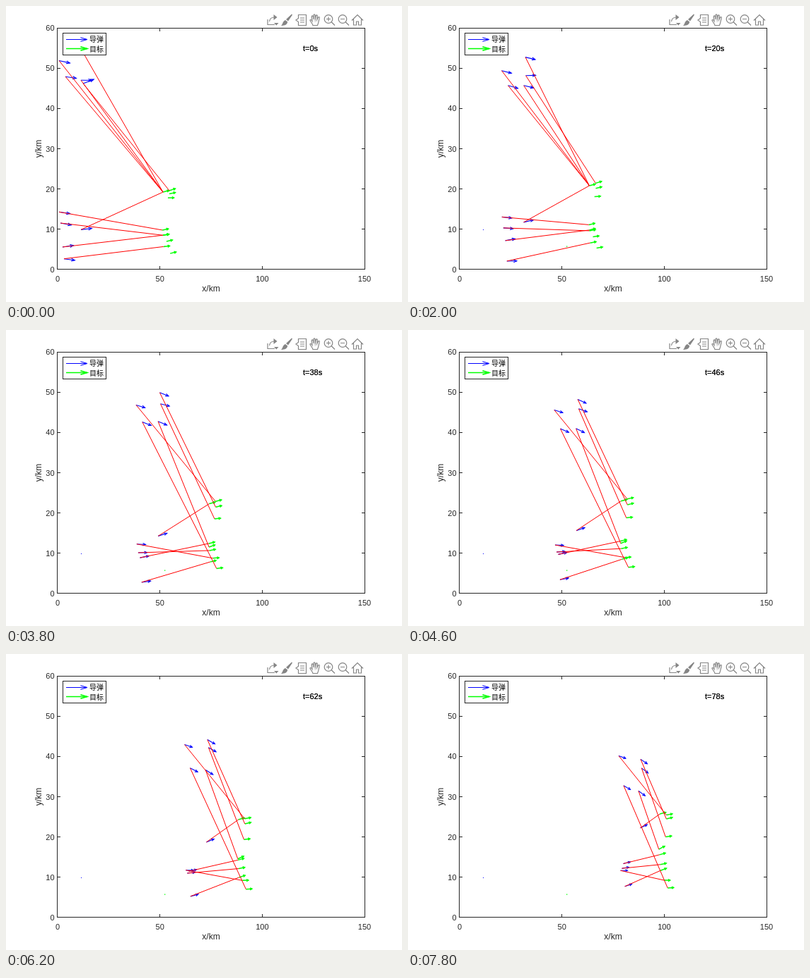
An HTML page with a canvas for the animation above (8000 ms loop, 560x420 px).

```html
<!DOCTYPE html>
<html lang="zh">
<head>
<meta charset="utf-8">
<title>x/km, y/km</title>
<style>
html, body { margin: 0; width: 100%; height: 100%; overflow: hidden; background: #fff; }
canvas { display: block; width: 560px; height: 420px; }
</style>
</head>
<body>
<canvas id="stage"></canvas>
<script>
const canvas = document.getElementById('stage');
const ctx = canvas.getContext('2d');
const ratio = window.devicePixelRatio || 1;
canvas.width = 560 * ratio;
canvas.height = 420 * ratio;

const RED = '#f00', BLUE = '#00f', GREEN = '#0f0', INK = '#262626', GREY = '#858585';
const SANS = '"Liberation Sans", Arial, sans-serif';
const CJK = '"Noto Sans CJK SC", "Noto Sans CJK", sans-serif';

// Axis units are km; both axes share the origin at the lower left.
const SX = 434 / 150, SY = 343 / 60;
const px = x => 73 + x * SX;
const py = y => 374 - y * SY;

const MISSILE_SPEED = 1, TARGET_SPEED = 0.6;
const TURN_FADE = 120;
const SWITCH = 30;

function craft(speed, x, y, heading, turn, aims) {
  return { speed, x, y, heading, turn, aims };
}

// Start in km, heading in rad, turn in rad/s, then the targets before and after the switch.
const missiles = [
  [0.7, 51.87, -0.113, -0.0012, 'ab'],
  [3.8, 47.9, -0.075, -0.0038, 'aj'],
  [11.4, 47, -0.008, -0.0061, 'af'],
  [12.45, 46.2, 0.19, -0.0097, 'bd'],
  [12.2, 54.1, -0.017, -0.0055, 'ac'],
  [11.4, 9.9, 0.064, 0.003, 'aa'],
  [0.7, 14.3, -0.075, 0.0013, 'eh'],
  [1.4, 11.55, -0.09, 0.0031, 'gg'],
  [2.4, 5.6, 0.0715, 0.0009, 'fe'],
  [3.1, 2.68, -0.0685, 0.0042, 'ii']
].map(row => craft(MISSILE_SPEED, ...row));

const targets = {};
[
  [51.5, 19.24, 0.129, 0.0003],
  [54.6, 19.6, 0.167, -0.0013],
  [54.6, 18.8, 0.112, 0.0003],
  [53.9, 17.8, 0.016, 0.001],
  [51.2, 9.8, 0.105, 0.0006],
  [51.4, 8.52, 0.0765, 0.0033],
  [51.5, 8.52, 0.09, 0.0003],
  [53.2, 7, 0.112, -0.002],
  [51.8, 5.7, 0.055, 0.0023],
  [55, 4, 0.126, -0.0017]
].forEach((row, i) => targets['abcdefghij'[i]] = craft(TARGET_SPEED, ...row));

// Constant speed along a heading whose turn rate fades out.
function fly({ speed, x, y, heading, turn }, time) {
  const dt = 0.5;
  const angle = t => heading + turn * TURN_FADE * (1 - Math.exp(-t / TURN_FADE));
  for (let t = dt / 2; t < time; t += dt) {
    x += speed * dt * Math.cos(angle(t));
    y += speed * dt * Math.sin(angle(t));
  }
  return { x: px(x), y: py(y), angle: angle(time) };
}

function line(color, width, ...points) {
  ctx.strokeStyle = color;
  ctx.lineWidth = width;
  ctx.beginPath();
  points.forEach(([x, y]) => ctx.lineTo(x, y));
  ctx.stroke();
}

function arrow(x, y, dx, dy, color, width) {
  const len = Math.hypot(dx, dy), ux = dx / len, uy = dy / len;
  const head = len * 0.32, half = 1 + len * 0.06;
  const tx = x + dx, ty = y + dy;
  const bx = tx - ux * head, by = ty - uy * head;
  line(color, width, [x, y], [tx, ty]);
  line(color, width, [bx - uy * half, by + ux * half], [tx, ty], [bx + uy * half, by - ux * half]);
}

function headingArrow({ x, y, angle }, length, color, width) {
  arrow(x, y, length * Math.cos(angle), -length * Math.sin(angle) * SY / SX, color, width);
}

function text(str, x, y, size, align, color = INK, family = SANS) {
  ctx.font = size + 'px ' + family;
  ctx.textAlign = align;
  ctx.fillStyle = color;
  ctx.fillText(str, x, y);
}

function frame(left, top, right, bottom) {
  ctx.strokeStyle = INK;
  ctx.lineWidth = 1;
  ctx.strokeRect(left + 0.5, top + 0.5, right - left, bottom - top);
}

function axes() {
  const left = 72, right = 507, top = 31, bottom = 373, tick = 5;
  frame(left, top, right, bottom);
  for (let v = 0; v <= 150; v += 50) {
    const x = Math.floor(px(v)) + 0.5;
    if (v % 150) {
      line(INK, 1, [x, bottom], [x, bottom - tick + 1]);
      line(INK, 1, [x, top], [x, top + tick]);
    }
    text(v, px(v), 391, 11, 'center');
  }
  for (let v = 0; v <= 60; v += 10) {
    const y = Math.floor(py(v)) + 0.5;
    if (v % 60) {
      line(INK, 1, [left, y], [left + tick, y]);
      line(INK, 1, [right, y], [right - tick + 1, y]);
    }
    text(v, 68.5, py(v) + 4, 11, 'right');
  }
  text('x/km', 290, 405, 12, 'center');
  ctx.save();
  ctx.translate(50, 202.5);
  ctx.rotate(-Math.PI / 2);
  text('y/km', 0, 0, 12, 'center');
  ctx.restore();
}

function legend() {
  ctx.fillStyle = '#fff';
  ctx.fillRect(80, 38, 62, 32);
  frame(80, 38, 141, 69);
  arrow(85, 47.5, 30, 0, BLUE, 1);
  arrow(85, 60.5, 30, 0, GREEN, 1.5);
  text('导弹', 118, 51, 10, 'left', '#000', CJK);
  text('目标', 118, 65, 10, 'left', '#000', CJK);
}

function icon(d, fill) {
  const path = new Path2D(d);
  ctx.strokeStyle = ctx.fillStyle = GREY;
  ctx.lineWidth = 1.2;
  if (fill) ctx.fill(path); else ctx.stroke(path);
}

function lens(x, plus) {
  icon(`M${x - 3} 18.5h6M${x + 4} 22.5l5 5`);
  if (plus) icon(`M${x} 15.5v6`);
  ctx.beginPath();
  ctx.arc(x, 18.5, 5.8, 0, 7);
  ctx.stroke();
}

function toolbar() {
  // Export, brush, note, hand, zoom in, zoom out, home.
  icon('M370 19v7.5h10M372.5 22c.5-4 3-6 7-6');
  icon('M378.5 12l5 4-5 4z', true);
  icon('M379 24h6.5l-3.2 3.6z', true);
  icon('M404 11.5l1 1-6 9-3-2.5zM395 20l3.2 2.6c-.5 4-4.5 5.6-9.2 5.4 2.5-1.5 2-6.5 6-8z', true);
  icon('M413.5 12.5h11v15h-11v-5l-3.5-2.5 3.5-2.5zM416 17h6M416 20h6M416 23h6');
  icon('M434 27.5c-1-3-3-5-4-7 0-1.5 1.5-1.5 3 .8l-.8-6.3c.2-1.5 1.7-1.3 2 0l.8 4V13c.2-1.4 1.8-1.4 2 0l.3 6 1-5.3c.4-1.3 2-1 2 .3l-.5 5.5 1.7-3.5c.8-1 2-.3 1.7 1-.8 4-1.2 7-2.7 10.5z');
  lens(456, true);
  lens(476, false);
  icon('M489 20.5l8-8 8 8M491.5 18.5v8.5h4v-5h3v5h4v-8.5');
}

function scene(t) {
  ctx.setTransform(ratio, 0, 0, ratio, 0, 0);
  ctx.fillStyle = '#fff';
  ctx.fillRect(0, 0, 560, 420);
  axes();

  const phase = t < SWITCH ? 0 : 1;
  const shots = missiles.map(m => ({ ...fly(m, t), aim: m.aims[phase] }));
  const marks = {};
  for (const key in targets) marks[key] = fly(targets[key], t);

  shots.forEach(s => headingArrow(s, 15.4 - 0.07 * t, BLUE, 1.1));
  Object.values(marks).forEach(m => headingArrow(m, 8.5, GREEN, 1.5));
  ctx.fillStyle = BLUE;
  ctx.fillRect(106, 317, 1, 1);
  ctx.fillStyle = GREEN;
  ctx.fillRect(224, 340.5, 1.3, 1.3);
  shots.forEach(s => line(RED, 1, [s.x, s.y], [marks[s.aim].x, marks[s.aim].y]));

  legend();
  // The clock is overprinted, which makes it a little heavier.
  for (let i = 0; i < 2; i++) text(`t=${t}s`, 420, 64, 11, 'left', '#000');
  toolbar();
}

const start = performance.now();
function play() {
  const elapsed = Math.max(0, performance.now() - start) % 8000;
  scene(2 * Math.floor(elapsed / 200));
  requestAnimationFrame(play);
}
play();
</script>
</body>
</html>
```
